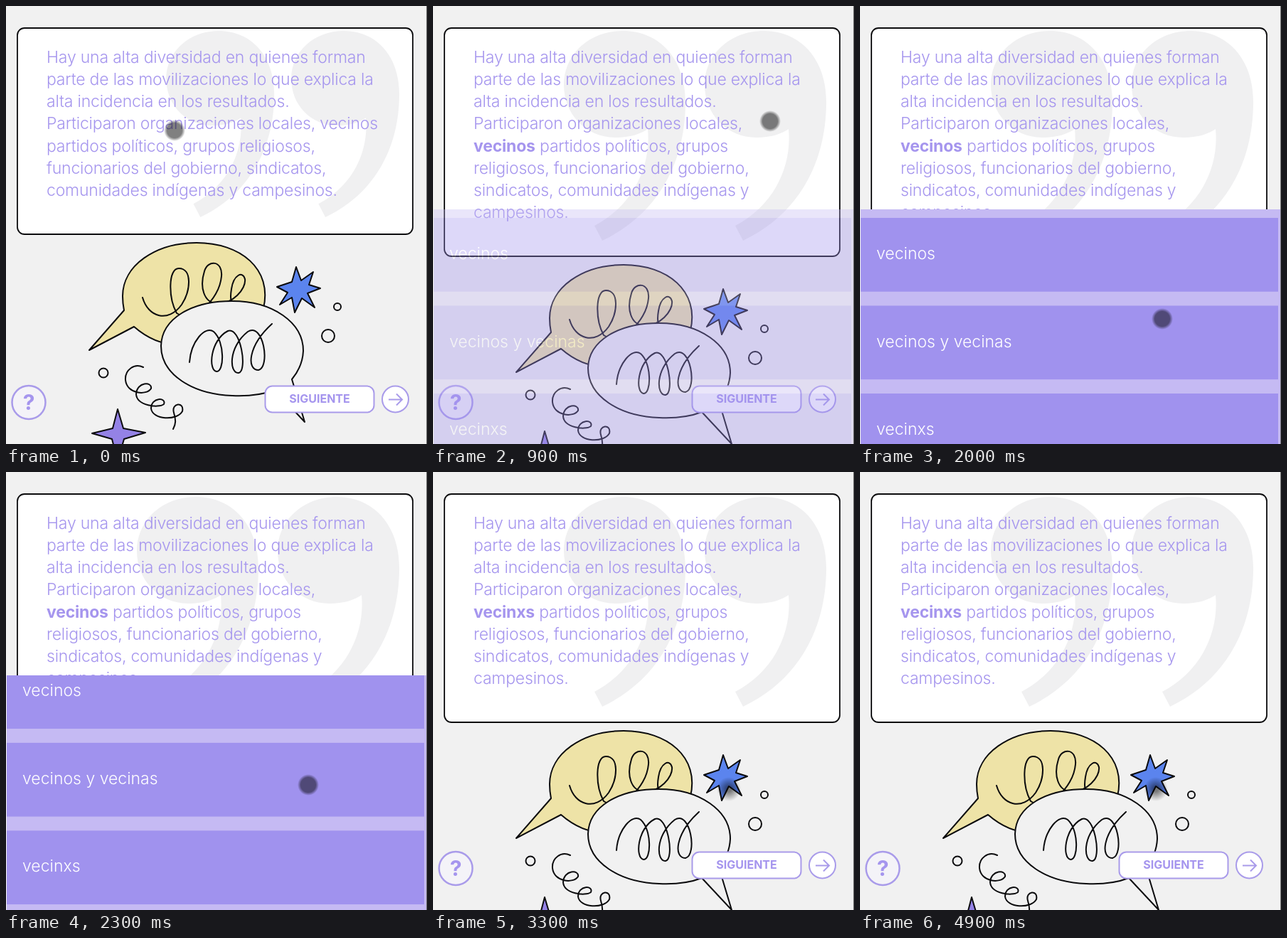
An HTML page for the animation above (5 s loop, 592 by 616 pixels).

```html
<!DOCTYPE html>
<html lang="es">
<head>
<meta charset="utf-8">
<style>
html, body { margin: 0; width: 100%; height: 100%; overflow: hidden; background: #f1f1f1; }
svg { display: block; width: 592px; height: 616px; }
text { font: 300 23px Inter, "Liberation Sans", sans-serif; font-optical-sizing: none; letter-spacing: -.2px; fill: #a595ee; white-space: pre; }
.bold { font-weight: 700; }
.ink { fill: none; stroke: #0b0b0d; stroke-width: 2; stroke-linejoin: round; stroke-linecap: round; }
.button { fill: #fff; stroke: #a99bea; stroke-width: 2; }
#panel text { fill: #fff; letter-spacing: 0; }
</style>
</head>
<body>
<svg viewBox="0 0 592 616">
  <defs>
    <radialGradient id="dot">
      <stop offset=".7" stop-opacity=".5"/>
      <stop offset="1" stop-opacity="0"/>
    </radialGradient>
    <radialGradient id="soft">
      <stop offset=".2" stop-opacity=".5"/>
      <stop offset="1" stop-opacity="0"/>
    </radialGradient>
    <clipPath id="view"><rect x="1" y="286" width="590" height="330"/></clipPath>
    <path id="mark" d="M553 135C553 75 517 35 465 35C418 35 382 68 382 111C382 152 413 185 455 185C475 185 490 180 500 173C505 225 480 280 425 309L436 330C510 295 553 225 553 135Z"/>
  </defs>

  <rect id="card" x="16" y="31" width="556" height="290" rx="10" fill="#fff" stroke="#0b0b0d" stroke-width="1.8"/>
  <g id="quote" fill="#f0f0f1"><use href="#mark"/><use href="#mark" x="-198"/></g>
  <g id="copy"></g>

  <g id="art" class="ink">
    <path fill="#eee3a7" d="M166 428L117 484L180 451C195 464 215 476 240 476L340 440L362 425C375 370 330 333 268 333C210 333 164 365 164 408Q164 418 166 428Z"/>
    <path d="M192 410C200 438 228 446 247 420C260 400 262 369 243 369C228 369 228 410 240 432C262 446 300 415 303 380C305 358 284 356 279 373C272 395 278 418 297 418C318 420 338 398 336 384C333 372 320 378 317 398Q315 410 317 416"/>
    <path fill="#f1f1f1" d="M402 525L420 585L378 540C360 547 340 549 318 548C262 546 218 518 218 478C219 440 260 415 318 415C375 415 418 445 418 485Q417 507 402 525Z"/>
    <path d="M258 501C260 472 280 449 292 458C308 472 307 515 296 514C284 512 287 470 312 457C330 450 340 514 327 516C314 517 312 480 340 458C362 444 372 508 355 512C338 512 340 478 374 447"/>
    <path fill="#5b84ee" d="M408 367L415 386L432 374L426 392L442 397L424 404L434 424L416 411L406 431L402 410L385 420L396 403L381 395L402 388Z"/>
    <circle cx="466" cy="423" r="5"/>
    <circle cx="453" cy="464" r="9"/>
    <circle cx="137" cy="516" r="6.5"/>
    <path d="M193 508C180 502 167 512 168 526C170 546 198 548 204 538C206 528 184 528 183 546C184 562 214 566 222 560C226 550 204 550 204 566C206 582 240 584 248 570C251 556 232 558 236 572C239 582 239 588 235 595"/>
    <path fill="#9482e6" d="M157 567L165 594L196 600L166 609L157 640L149 609L121 601L150 594Z"/>
  </g>
  <circle id="shade" cx="416" cy="446" r="17" fill="url(#soft)"/>

  <circle class="button" cx="32" cy="557.5" r="23.5" style="fill:#f4f3f8;stroke-width:2.5"/>
  <text class="bold" x="32" y="568" text-anchor="middle" style="font-size:30px">?</text>
  <rect class="button" x="364.5" y="534.5" width="153" height="37" rx="10"/>
  <text class="bold" x="441" y="558" text-anchor="middle" style="font-size:16px;letter-spacing:0">SIGUIENTE</text>
  <circle class="button" cx="547.5" cy="553" r="18.5"/>
  <path class="button" d="M538 553.5H557M549 545.5L557 553.5L549 561.5" style="fill:none"/>

  <g id="panel" clip-path="url(#view)">
    <rect y="286" width="592" height="330" fill="#c5baf3"/>
    <g id="list"></g>
  </g>
  <path d="M591.5 0V616" stroke="#777"/>
  <circle id="cursor" r="15" fill="url(#dot)"/>
</svg>
<script>
const $ = id => document.getElementById(id);
const show = (id, on) => $(id).setAttribute('visibility', on ? 'visible' : 'hidden');
const move = (id, x, y) => $(id).setAttribute('transform', `translate(${x} ${y})`);
const ease = (t, from, to) => {
  const p = Math.min(1, Math.max(0, (t - from) / (to - from)));
  return (1 - Math.cos(Math.PI * p)) / 2;
};

const intro = ['Hay una alta diversidad en quienes forman',
  'parte de las movilizaciones lo que explica la',
  'alta incidencia en los resultados.'];
const plain = [...intro, 'Participaron organizaciones locales, vecinos',
  'partidos políticos, grupos religiosos,',
  'funcionarios del gobierno, sindicatos,',
  'comunidades indígenas y campesinos.'];
const chosen = word => [...intro, 'Participaron organizaciones locales,',
  `<tspan class="bold">${word}</tspan> partidos políticos, grupos`,
  'religiosos, funcionarios del gobierno,',
  'sindicatos, comunidades indígenas y',
  'campesinos.'];

$('list').innerHTML = ['vecinos', 'vecinos y vecinas', 'vecinxs', 'la población'].map((word, i) => {
  const y = 298 + i * 123.5;
  return `<rect x="1" y="${y}" width="587" height="103.7" fill="#a092ee"/><text x="23" y="${y + 58}">${word}</text>`;
}).join('');

let shown;
function setCopy(state) {
  if (state === shown) return;
  shown = state;
  const lines = state ? chosen(state) : plain;
  $('copy').innerHTML = lines.map((s, i) => `<text x="57" y="${80 + i * 31.14}">${s}</text>`).join('');
  $('card').setAttribute('height', state ? 321 : 290);
  const k = state ? 1 : .888;
  $('quote').setAttribute('transform', `translate(553 35) scale(${k}) translate(-553 -35)`);
  move('art', 0, state ? 31 : 0);
}

function draw(now) {
  const t = now % 5000, closed = t >= 3200;
  setCopy(t < 700 ? '' : closed ? 'vecinxs' : 'vecinos');

  show('panel', t >= 700 && !closed);
  $('panel').setAttribute('opacity', ease(t, 700, 1200));
  move('list', 0, -161 * ease(t, 2100, 2700));

  const across = ease(t, 0, 600), down = ease(t, 1200, 1800);
  move('cursor', 237 + 237 * across - 49 * down, 175 - 13 * across + 278 * down);
  show('cursor', !closed);
  show('shade', closed);
  requestAnimationFrame(draw);
}
requestAnimationFrame(draw);
</script>
</body>
</html>
```
